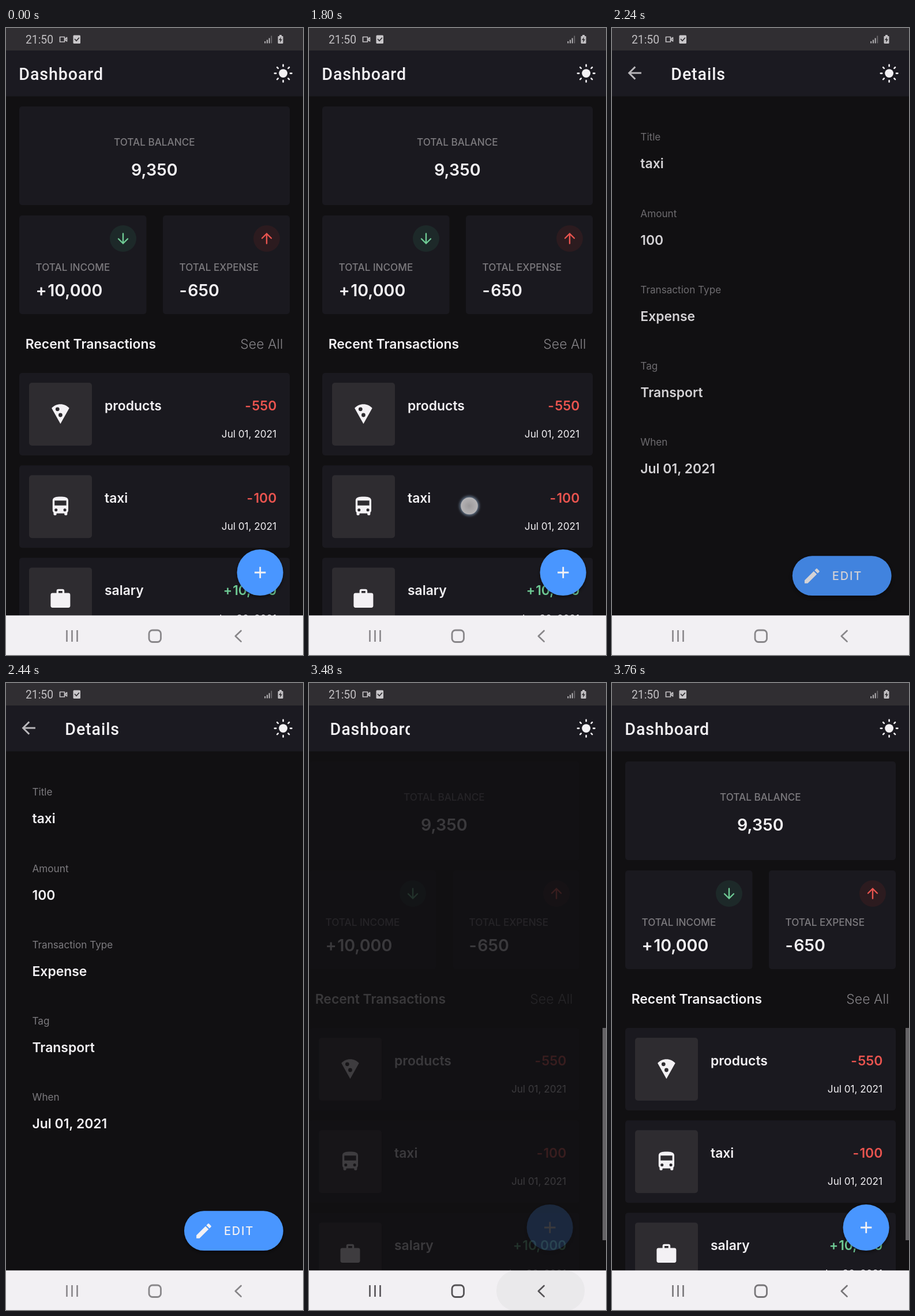
An HTML page for the animation above (4.04 s loop, 515 by 1087 pixels).

```html
<!DOCTYPE html>
<html lang="en">
<head>
<meta charset="utf-8">
<title>Expense dashboard</title>
<style>
  html, body { margin: 0; width: 100%; height: 100%; overflow: hidden; background: #111012; }
  svg { display: block; width: 100%; height: 100%; }
  text { font-family: Inter, sans-serif; fill: #f3f1f4; }
  .bar { font-family: Roboto, sans-serif; font-weight: 500; font-size: 28.6px; letter-spacing: .9px; }
  .clock { font-family: Roboto, sans-serif; font-size: 19.3px; fill: #c2c0c3; }
  .caps { font-size: 17.15px; font-weight: 500; fill: #7c7a7e; }
  .big { font-size: 28.6px; font-weight: 600; }
  .mid { font-size: 22.9px; font-weight: 600; }
  .small { font-size: 17.15px; }
  .label { font-size: 17.15px; fill: #7c7a7e; }
  .more { font-size: 22.9px; font-weight: 300; letter-spacing: .1px; fill: #858387; }
  .edit { font-size: 20px; font-weight: 500; letter-spacing: 1.8px; }
  .sign { letter-spacing: .05em; }
  .card { fill: #1a191f; }
  .line { fill: none; stroke-linecap: round; stroke-linejoin: round; }
  .leaves > * { opacity: var(--alpha); }
</style>
</head>
<body>
<svg id="stage" viewBox="0 0 515 1087"></svg>
<script>
const LOOP = 4040, STEP = 40, SLIDE = 43, DURATION = 300;
const RED = '#e9544f', GREEN = '#6fcb95', BLUE = '#4a96ff', WHITE = '#f3f1f4';

const ICONS = {
  pizza: 'M12 2C8.43 2 5.23 3.54 3.01 6L12 22l8.99-16C18.78 3.55 15.57 2 12 2zM7 7a2 2 0 1 1 4 0 2 2 0 1 1-4 0zM10 13a2 2 0 1 1 4 0 2 2 0 1 1-4 0z',
  bus: 'M4 16c0 .88.39 1.67 1 2.22V20a1 1 0 0 0 1 1h1a1 1 0 0 0 1-1v-1h8v1a1 1 0 0 0 1 1h1a1 1 0 0 0 1-1v-1.78c.61-.55 1-1.34 1-2.22V6c0-3.5-3.58-4-8-4s-8 .5-8 4zM6 15.5a1.5 1.5 0 1 1 3 0 1.5 1.5 0 1 1-3 0zM15 15.5a1.5 1.5 0 1 1 3 0 1.5 1.5 0 1 1-3 0zM6 11V6h12v5z',
  work: 'M20 6h-4V4a2 2 0 0 0-2-2h-4a2 2 0 0 0-2 2v2H4a2 2 0 0 0-2 2v11a2 2 0 0 0 2 2h16a2 2 0 0 0 2-2V8a2 2 0 0 0-2-2zM14 6h-4V4h4z',
  pencil: 'M3 17.25V21h3.75L17.81 9.94l-3.75-3.75zM20.71 7.04a1 1 0 0 0 0-1.41l-2.34-2.34a1 1 0 0 0-1.41 0l-1.83 1.83 3.75 3.75z',
  back: 'M20 11H7.83l5.59-5.59L12 4l-8 8 8 8 1.41-1.41L7.83 13H20z'
};

const icon = (name, cx, cy, scale, fill = WHITE, id = '') =>
  `<path ${id && `id="${id}"`} d="${ICONS[name]}" fill="${fill}" fill-rule="evenodd"
    transform="translate(${cx} ${cy}) scale(${scale}) translate(-12 -12)"/>`;
const rect = (x, y, w, h, r, attrs) =>
  `<rect x="${x}" y="${y}" width="${w}" height="${h}" rx="${r}" ${attrs}/>`;
const text = (x, y, cls, str, anchor = 'start', fill = '') =>
  `<text x="${x}" y="${y}" class="${cls}" text-anchor="${anchor}" ${fill && `style="fill:${fill}"`}>${
    str.replace(/^[+-]/, '<tspan class="sign">$&</tspan>')}</text>`;
const line = (d, color, width, attrs = '') =>
  `<path class="line" d="${d}" stroke="${color}" stroke-width="${width}" ${attrs}/>`;

const badge = (x, tint, color, dir) => `<g transform="translate(${x} 365)">
  <circle r="23" fill="${tint}"/>
  ${line('M0 -8.5V8.5M-8 .5L0 8.5L8 .5', color, 2.4, `transform="scale(1 ${dir})"`)}</g>`;

const row = (y, name, title, amount, color, date) =>
  rect(23, y, 469, 143, 5, 'class="card"') +
  rect(40, y + 17, 109, 109, 5, 'fill="#2e2c30"') +
  icon(name, 94.4, y + 71.3, 1.7) +
  text(171, y + 64.7, 'mid', title) +
  text(469.3, y + 64.7, 'mid', amount, 'end', color) +
  text(469, y + 112, 'small', date, 'end');

const dashboard =
  rect(23, 136, 469, 171, 5, 'class="card"') +
  rect(23, 325, 220.5, 171, 5, 'class="card"') +
  rect(272, 325, 220, 171, 5, 'class="card"') +
  text(257.3, 203.8, 'caps', 'TOTAL BALANCE', 'middle') +
  text(257.3, 256, 'big', '9,350', 'middle') +
  badge(203, '#1d2929', GREEN, 1) +
  badge(452, '#2c1b1f', RED, -1) +
  text(51.5, 421, 'caps', 'TOTAL INCOME') +
  text(51.5, 465, 'big', '+10,000') +
  text(300.5, 421, 'caps', 'TOTAL EXPENSE') +
  text(300.5, 465, 'big', '-650') +
  text(33.7, 556, 'mid', 'Recent Transactions') +
  text(480.5, 556, 'more', 'See All', 'end') +
  row(598, 'pizza', 'products', '-550', RED, 'Jul 01, 2021') +
  row(758.2, 'bus', 'taxi', '-100', RED, 'Jul 01, 2021') +
  row(918.4, 'work', 'salary', '+10,000', GREEN, 'Jun 30, 2021') +
  `<g><circle cx="440.6" cy="944" r="40" fill="${BLUE}" filter="url(#shadow)"/>
   ${line('M431 944h19.4M440.7 934.3v19.4', WHITE, 2.8, 'style="stroke-linecap:butt"')}</g>`;

const fields = [['Title', 'taxi'], ['Amount', '100'], ['Transaction Type', 'Expense'],
  ['Tag', 'Transport'], ['When', 'Jul 01, 2021']];
const details = fields.map(([label, value], i) =>
  text(45.5, 195.2 + i * 132.3, 'label', label) +
  text(45.5, 243.2 + i * 132.3, 'mid', value)).join('') +
  `<g>${rect(309, 915.3, 171.7, 68.7, 34.3, `fill="${BLUE}" filter="url(#shadow)"`)}
   ${icon('pencil', 343, 950, 1.43)}${text(378, 957.3, 'edit', 'EDIT')}</g>`;

const rays = Array.from({ length: 8 }, (_, i) =>
  line('M0 -12.4V-14.8', WHITE, 2.6, `transform="rotate(${i * 45})"`)).join('');

const statusBar = rect(0, 0, 515, 39, 0, 'fill="#302e32"') +
  text(34, 26.6, 'clock', '21:50') +
  line('M93.5 15.5h8v8.5h-8zM102 19.7l3.5 -3.2v6.5z', '#c2c0c3', 1.7) +
  rect(116.5, 12.5, 12.5, 14.5, 1.5, 'fill="#c9c7ca"') +
  line('M119.5 19.5l2.5 2.8 4.5 -5', '#302e32', 1.7) +
  [3.5, 6, 9, 13].map((h, i) =>
    rect(448.3 + i * 3.7, 26.5 - h, 1.8, h, 0, `fill="#c2c0c3" opacity="${i < 3 ? 1 : .4}"`)).join('') +
  rect(471.5, 14, 9, 13, 1.2, 'fill="#c2c0c3"') + rect(474, 12, 4, 2.5, 0, 'fill="#c2c0c3"') +
  '<path d="M477 15.5l-4 5.5h2.6l-.8 4.5 4.2 -6h-2.7z" fill="#302e32"/>';

const navBar = rect(0, 1018.4, 515, 69, 0, 'fill="#f2f0f3"') +
  rect(325, 1018.5, 153, 70, 34, 'id="press"') +
  `<g id="navIcons">${line('M105.5 1044v20M114.5 1044v20M123.5 1044v20', 'currentColor', 2.6, 'style="stroke-linecap:butt"')}
   ${rect(248, 1044, 20.5, 20.5, 6, 'class="line" stroke="currentColor" stroke-width="2.8"')}
   ${line('M407.5 1045L397.8 1054.3L407.5 1063.6', 'currentColor', 2.7)}</g>`;

document.getElementById('stage').innerHTML = `
  <defs>
    <filter id="shadow" x="-30%" y="-30%" width="160%" height="170%">
      <feDropShadow dx="0" dy="3" stdDeviation="3" flood-color="#000" flood-opacity=".45"/></filter>
    <filter id="soft" x="-50%" y="-50%" width="200%" height="200%"><feGaussianBlur stdDeviation="2"/></filter>
    <radialGradient id="dot"><stop offset="0" stop-color="#9b999b"/><stop offset="1" stop-color="#b5b3b5"/></radialGradient>
    <clipPath id="titleClip"><rect id="titleBox" y="40" height="76"/></clipPath>
  </defs>
  ${rect(0, 0, 515, 1087, 0, 'fill="#111012"')}
  <g id="details" class="leaves">${details}</g>
  <g id="dashboard" class="leaves">${dashboard}</g>
  ${rect(509, 598, 6, 368, 0, 'id="scrollbar" fill="#656366"')}
  ${rect(0, 38.5, 515, 80, 0, 'fill="#1b1a21"')}
  ${statusBar}
  ${icon('back', 39.2, 78, 1.46, '#b8b6ba', 'arrow')}
  <g clip-path="url(#titleClip)"><text id="title" class="bar" y="90.3"></text></g>
  <g transform="translate(480.6 78.6)"><circle r="7.4" fill="${WHITE}"/>${rays}</g>
  ${navBar}
  <g id="touch"><circle cx="278" cy="828.5" r="17" fill="#7b93ab" opacity=".75" filter="url(#soft)"/>
    <circle cx="278" cy="828.5" r="14.8" fill="url(#dot)"/></g>`;

const el = id => document.getElementById(id);
const clamp = v => Math.min(1, Math.max(0, v));
const mix = (a, b, k) => a + (b - a) * k;
const show = (id, on) => { el(id).style.display = on ? '' : 'none'; };

// cubic-bezier(.4, 0, .2, 1)
function ease(x) {
  if (x <= 0 || x >= 1) return clamp(x);
  let lo = 0, hi = 1;
  for (let i = 0; i < 24; i++) {
    const s = (lo + hi) / 2, r = 1 - s;
    if (1.2 * r * r * s + .6 * r * s * s + s ** 3 < x) lo = s; else hi = s;
  }
  return lo * lo * (3 - 2 * lo);
}

const progress = (t, start) => ease((t - start) / DURATION);
const fadeOut = p => clamp(1 - p / .35);
const fadeIn = p => clamp((p - .35) / .65);

function place(id, x, alpha) {
  show(id, alpha > 0);
  el(id).setAttribute('transform', `translate(${x} 0)`);
  el(id).style.setProperty('--alpha', alpha);
}

function render(t) {
  const open = 2045, close = 3379, titleOut = 1985, titleBack = 3318;
  const back = t >= close;
  const p = progress(t, back ? close : open);
  place('dashboard', -SLIDE * (back ? 1 - p : p), back ? fadeIn(p) : fadeOut(p));
  place('details', SLIDE * (back ? p : 1 - p), back ? fadeOut(p) : fadeIn(p));

  const onDetails = t >= titleOut && t < titleBack;
  const move = t < titleOut ? 1 : progress(t, titleBack);
  const left = mix(102.3, 22.3, move);
  el('title').textContent = onDetails ? 'Details' : 'Dashboard';
  el('title').setAttribute('x', left);
  el('titleBox').setAttribute('x', left);
  el('titleBox').setAttribute('width', mix(93.5, 148, move));
  show('arrow', onDetails);

  show('touch', t >= 1800 && t < 1920);
  show('scrollbar', t >= titleBack);
  const pressed = clamp((t - 3040) / 160);
  const released = clamp((t - 3320) / 280);
  el('press').setAttribute('opacity', .07 * pressed * (1 - released));
  const gray = t < 3600 ? mix(136, 84, pressed) : 119;
  el('navIcons').style.color = `rgb(${gray},${gray - 2},${gray + 1})`;
}

const start = performance.now();
function tick() {
  const t = (performance.now() - start) % LOOP;
  render(Math.floor(t / STEP) * STEP);
  requestAnimationFrame(tick);
}
tick();
</script>
</body>
</html>
```
